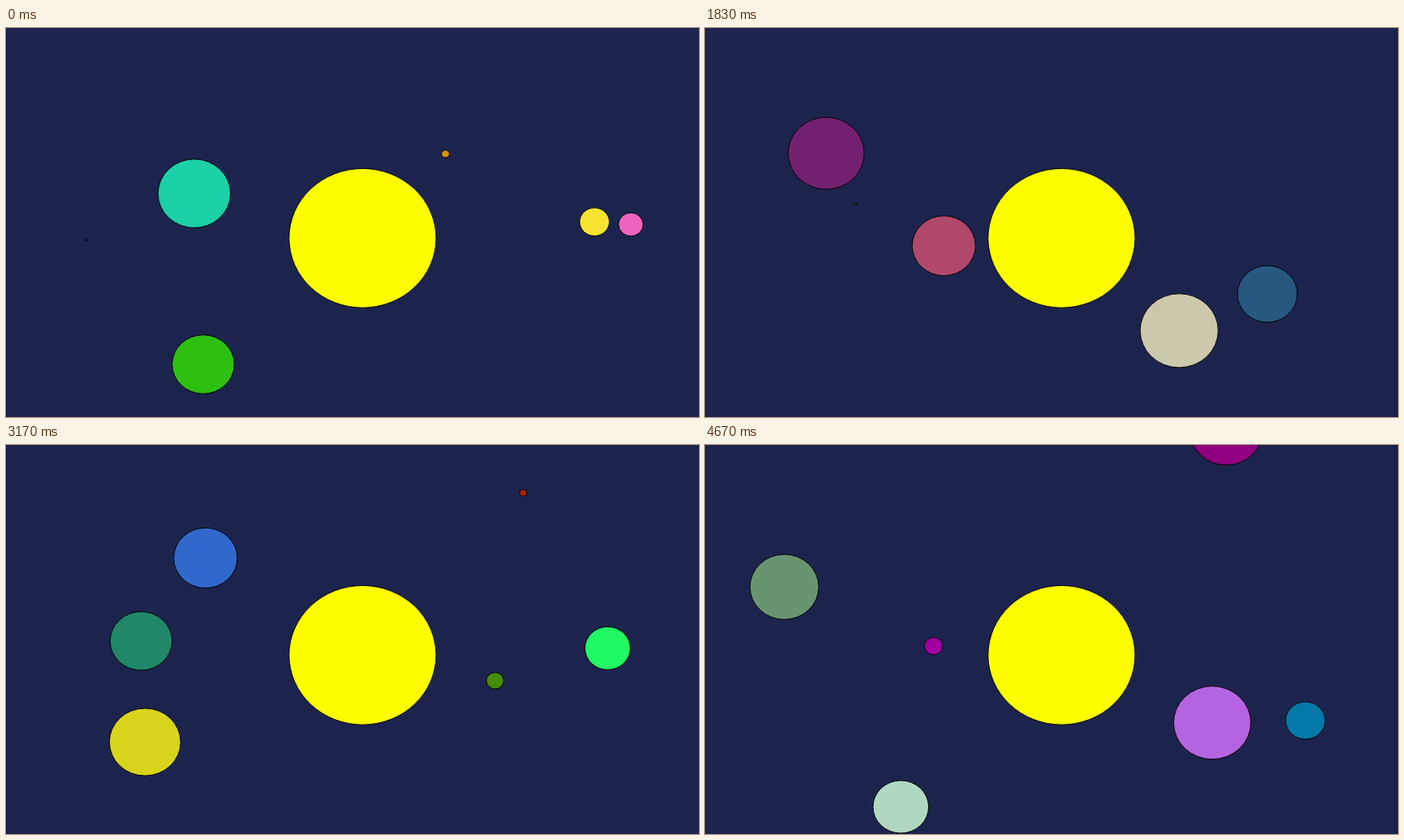
Animation, 854 px wide and 480 px high, one loop 4760 ms. Source, as an HTML page with a canvas:

```html
<!DOCTYPE html>
<html lang="en">
<head>
<meta charset="utf-8">
<title>Orbits</title>
<style>
html, body { margin: 0; width: 100%; height: 100%; overflow: hidden; background: #1c244e; }
canvas { display: block; }
</style>
</head>
<body>
<canvas id="stage" width="854" height="480"></canvas>
<script>
const ctx = document.getElementById('stage').getContext('2d');
const LOOP = 4760, FPS = 12, LAST = 56, LEAD = 8;
const CX = 439.4, CY = 259.3, SQUASH = 0.9475;

// Each system turns rigidly; planets are [x, y, radius, colour] at step `at`.
const systems = [
  { from: 0, at: 0, rate: 10, planets: [
    [232, 204.2, 44.7, '#1cd0a8'],
    [99, 262, 1.2, '#300820'],
    [243, 415, 38.3, '#2ec010'],
    [541.5, 155.3, 4.9, '#d89004'],
    [725.2, 239.2, 18.3, '#f8e430'],
    [770, 242.4, 15.2, '#ec64c0']
  ] },
  { from: 2, at: 8, rate: 9.6, planets: [
    [386, 101, 20.7, '#04e4fc'],
    [195.8, 164, 33.9, '#b4489c'],
    [95.2, 230.4, 27.7, '#dcc828'],
    [673, 197.5, 1.2, '#0c1020'],
    [678, 415.6, 48.9, '#8460cc'],
    [570, 496, 23.4, '#608868']
  ] },
  { from: 16, at: 22, rate: 10, planets: [
    [149.3, 154.6, 46.9, '#742070'],
    [185, 217, 1.8, '#483818'],
    [294.3, 268.7, 39, '#b0486c'],
    [584.3, 373.4, 48.1, '#ccc8ac'],
    [693, 328.2, 36.9, '#285880']
  ] },
  { from: 29, at: 38, rate: 10.33, planets: [
    [637.3, 59, 4.2, '#b42404'],
    [245.8, 139.4, 39.2, '#3068cc'],
    [166.5, 241.8, 38.2, '#208868'],
    [171.3, 366.5, 43.9, '#d8d41c'],
    [602.6, 290.8, 10.7, '#448c04'],
    [741.4, 250.8, 28, '#20f864']
  ] },
  { from: 43, at: 46, rate: 9.82, planets: [
    [121.4, 108.5, 44.6, '#900080'],
    [500, 73.3, 47.6, '#b464e0'],
    [450.2, 409, 11.3, '#a000a4'],
    [663.2, 418.4, 34.3, '#b0d8c0'],
    [400.2, 591.7, 42.4, '#689470'],
    [480.8, -34, 24.4, '#0478a8']
  ] }
];

function disc(x, y, r, colour) {
  ctx.beginPath();
  ctx.arc(x, y, r, 0, Math.PI * 2);
  ctx.fillStyle = colour;
  ctx.fill();
  ctx.stroke();
}

function draw(step) {
  ctx.setTransform(1, 0, 0, 1, 0, 0);
  ctx.fillStyle = '#1c244e';
  ctx.fillRect(0, 0, 854, 480);

  ctx.setTransform(1, 0, 0, SQUASH, CX, CY);
  ctx.strokeStyle = '#000';
  ctx.lineWidth = 1;
  disc(0, 0, 90.6, '#fdfd00');

  const sys = systems.filter(s => s.from <= step).pop();
  const turn = (step - sys.at) * sys.rate * Math.PI / 180;
  const c = Math.cos(turn), s = Math.sin(turn);
  for (const [px, py, r, colour] of sys.planets) {
    const x = px - CX, y = (py - CY) / SQUASH;
    disc(x * c - y * s, x * s + y * c, r, colour);
  }
}

const start = performance.now();
function tick() {
  const t = Math.max(0, performance.now() - start) % LOOP;
  draw(Math.min(LAST, Math.floor((t + LEAD) * FPS / 1000)));
  requestAnimationFrame(tick);
}
tick();
</script>
</body>
</html>
```
